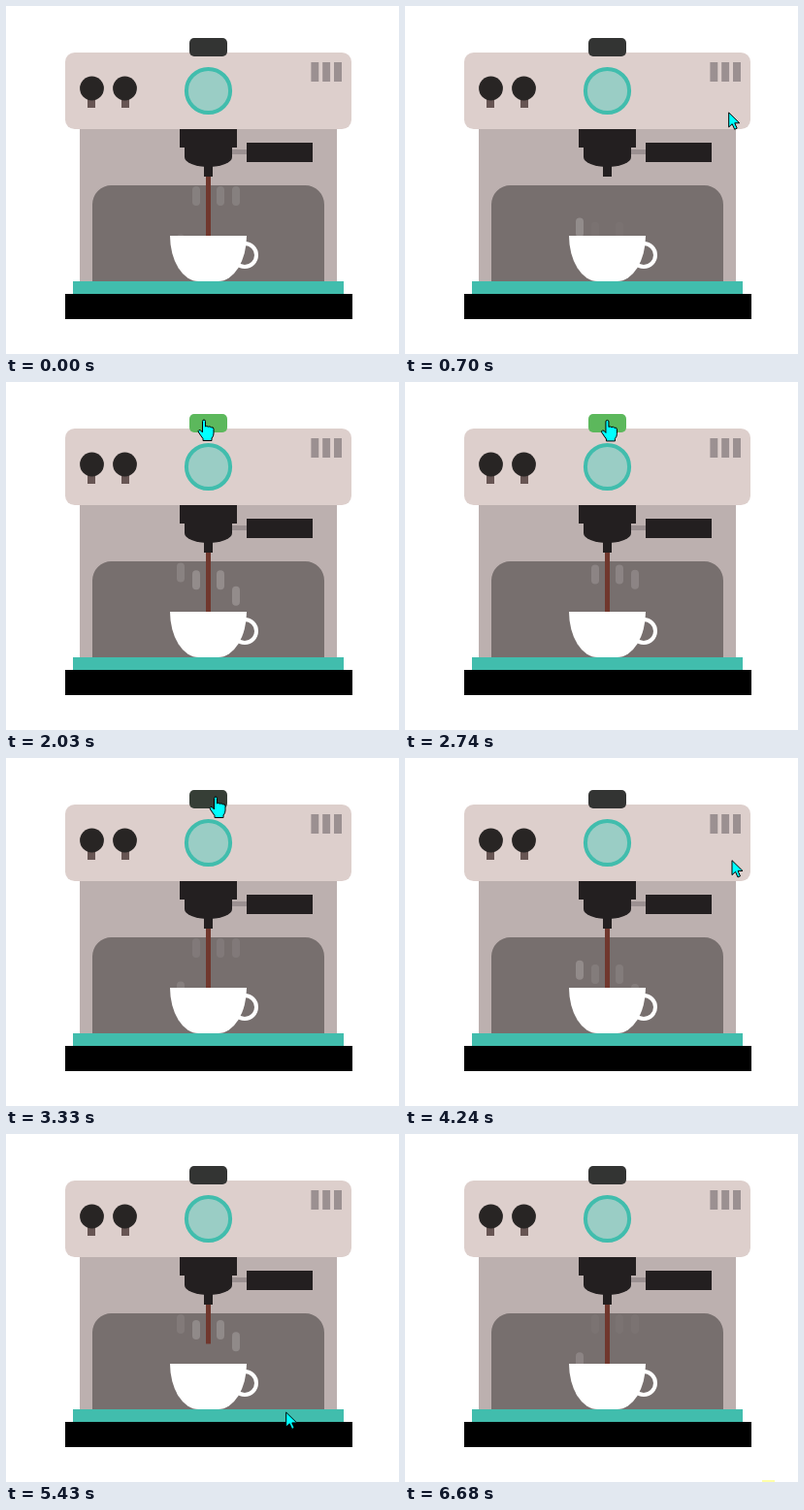
Animation of 405 by 359 pixels, one loop 6.75 s. Source, as an HTML page:

```html
<!DOCTYPE html>
<html lang="en">
<head>
<meta charset="utf-8">
<title>Coffee machine</title>
<style>
  html, body { margin: 0; width: 100%; height: 100%; overflow: hidden; background: #fff; }
  svg { display: block; width: 405px; height: 359px; }
  .ink { fill: #231f20; }
  .teal { fill: #41bdad; }
  .grey { fill: #9b9091; }
  .stem { fill: #675553; }
  .knob { fill: #282524; }
  .smoke { fill: #b3aeae; }
  .pointer { fill: #0ff; stroke: #000; stroke-width: 1; stroke-linejoin: round; }
</style>
</head>
<body>
<svg viewBox="0 0 405 359">
  <!-- body -->
  <rect x="76" y="127" width="265" height="157" fill="#bcb0af"/>
  <path d="M89 284V204.7a19.7 19.7 0 0 1 19.7-19.7H308.3a19.7 19.7 0 0 1 19.7 19.7V284Z" fill="#776f6e"/>

  <!-- header -->
  <rect x="61" y="48" width="295" height="79" rx="9.8" fill="#ddcfcc"/>
  <rect class="stem" x="84" y="95" width="8" height="10"/>
  <rect class="stem" x="119" y="95" width="8" height="10"/>
  <circle class="knob" cx="88.5" cy="85" r="12.4"/>
  <circle class="knob" cx="122.5" cy="85" r="12.4"/>
  <circle cx="208.5" cy="87.5" r="22.6" fill="#9acdc5" stroke="#41bdad" stroke-width="4"/>
  <path class="grey" d="M314.4 58h7.9v20h-7.9ZM326.2 58h7.9v20h-7.9ZM338 58h8v20h-8Z"/>
  <rect id="button" x="189" y="33" width="39" height="19" rx="4.9"/>

  <!-- brew head -->
  <rect class="grey" x="233" y="148" width="15" height="5"/>
  <rect class="ink" x="248" y="141" width="68" height="20"/>
  <rect class="ink" x="179" y="127" width="59" height="19"/>
  <path class="ink" d="M184 146H233V156A24.5 10 0 0 1 184 156Z"/>
  <rect class="ink" x="204" y="165" width="9" height="11"/>
  <rect id="liquid" x="206" y="176" width="5" height="0" fill="#70372d"/>

  <g id="steam"></g>

  <!-- cup -->
  <circle cx="246" cy="257" r="12" fill="none" stroke="#fff" stroke-width="4"/>
  <path d="M169 237H248A29.5 47 0 0 1 218.5 284H198.5A29.5 47 0 0 1 169 237Z" fill="#fff"/>

  <rect class="teal" x="69" y="284" width="279" height="13"/>
  <rect x="61" y="297" width="296" height="26"/>

  <rect id="glow" x="368" y="357" width="13" height="2" fill="#ffffa8"/>

  <g id="cursor">
    <path id="arrow" class="pointer" d="M.5.5V15.5L4 12.2 6.5 17.8 9 16.7 6.6 11.3H11.5Z"/>
    <path id="hand" class="pointer" d="M-1.5 11V1.5Q-1.5 0 0 0T1.5 1.5V7Q2.5 5.8 4.5 7.2 6 6.2 7.4 7.8 10 7.2 10 9.5V14Q10 17 8 19V21.5H-1V19.5L-5.5 13Q-6.5 11 -5 10.5 -3.5 10 -1.5 13Z"/>
  </g>
</svg>

<script>
const LOOP = 6750;
const STEAM_MS = 3130, POUR_MS = 4173;
const byId = id => document.getElementById(id);
const frac = v => v - Math.floor(v);
const mix = (a, b, k) => a + (b - a) * k;
// 0 before a, 1 after b, linear between
const ramp = (v, a, b) => Math.min(1, Math.max(0, (v - a) / (b - a)));

// Pointer stops: time, x, y
const stops = [
  [210, 364, 355], [560, 375, 185], [840, 284, 53], [1260, 204.5, 30],
  [2030, 204, 39], [3330, 216, 40], [3680, 234, 47], [4240, 336.5, 105],
  [5080, 220, 269], [5430, 288, 286.5], [5900, 370, 360]
];

// Smooth curve through the stops; the slope at each comes from its neighbours
function pointerAt(t) {
  const last = stops.length - 1;
  let i = 0;
  while (i < last - 1 && t > stops[i + 1][0]) i++;
  const a = stops[i], b = stops[i + 1];
  const span = b[0] - a[0], s = ramp(t, a[0], b[0]);
  const slope = (n, axis) => {
    const p = stops[Math.max(0, n - 1)], q = stops[Math.min(last, n + 1)];
    return (q[axis] - p[axis]) / (q[0] - p[0]) * span;
  };
  return [1, 2].map(axis =>
    mix(a[axis], b[axis], s * s * (3 - 2 * s))
    + slope(i, axis) * s * (1 - s) ** 2
    - slope(i + 1, axis) * s * s * (1 - s));
}

const puffs = [176, 192, 217, 233].map((x, i) => {
  const el = document.createElementNS('http://www.w3.org/2000/svg', 'rect');
  const attrs = { class: 'smoke', x, width: 8, height: 20, rx: 4 };
  for (const name in attrs) el.setAttribute(name, attrs[name]);
  byId('steam').append(el);
  const outer = i % 3 === 0;
  return { el, base: outer ? 20 : 40, offset: i === 0 ? .143 : -.18 };
});

const button = byId('button'), liquid = byId('liquid'), cursor = byId('cursor');
const arrow = byId('arrow'), hand = byId('hand'), glow = byId('glow');
const show = (el, on) => el.setAttribute('visibility', on ? 'visible' : 'hidden');

function drawSteam(t) {
  for (const { el, base, offset } of puffs) {
    const p = frac(offset + t / STEAM_MS);
    const rise = ramp(p, 0, .4), drift = ramp(p, .4, .8), fade = ramp(p, .8, 1);
    el.setAttribute('y', 266 - base - 30 * rise - (50 - base) * drift);
    el.setAttribute('opacity', .5 * rise - .2 * drift - .3 * fade);
  }
}

function drawPour(t) {
  const p = frac(.848 + t / POUR_MS);
  liquid.setAttribute('height', 61 * ramp(p, .05, .2));
  liquid.setAttribute('opacity', 1 - ramp(p, .95, 1));
}

function drawButton(t) {
  const lit = ramp(t, 1330, 1680) * (1 - ramp(t, 2980, 3466)) ** 2;
  const [edge, mid] = [mix(51, 92, lit), mix(52, 184, lit)].map(Math.round);
  button.setAttribute('fill', `rgb(${edge},${mid},${edge})`);
}

function drawPointer(t) {
  const visible = t >= 210 && t < 5900;
  const pressing = t >= 1380 && t < 3540;
  cursor.setAttribute('transform', `translate(${pointerAt(t)})`);
  show(arrow, visible && !pressing);
  show(hand, visible && pressing);
  show(glow, t >= 6540);
}

function draw(time) {
  const t = time < 210 ? 0 : time;
  drawSteam(t);
  drawPour(t);
  drawButton(t);
  drawPointer(t);
}

const start = performance.now();
function tick() {
  draw((performance.now() - start) % LOOP);
  requestAnimationFrame(tick);
}
tick();
</script>
</body>
</html>
```
